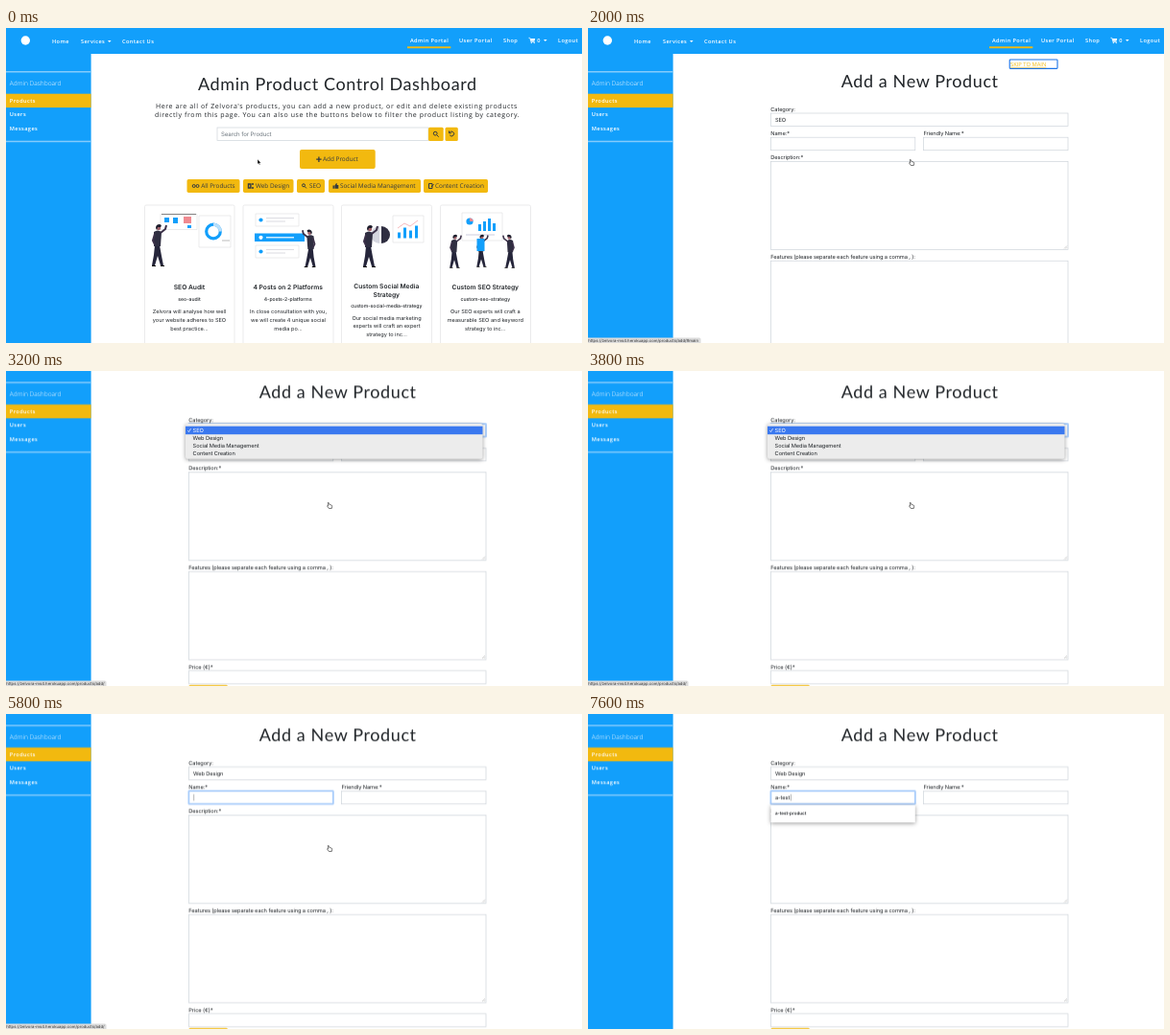
Recreate the animation shown at these times as an HTML page. Size 600 by 329 pixels, loop 8 s.

```html
<!DOCTYPE html>
<html lang="en">
<head>
<meta charset="utf-8">
<title>Admin dashboard</title>
<style>
html, body { margin: 0; width: 100%; height: 100%; overflow: hidden; background: #fff; }
svg { display: block; width: 600px; height: 329px; }
text { font: 5.7px Inter, sans-serif; letter-spacing: -.1px; fill: #212529; text-rendering: geometricPrecision; white-space: pre; }
.h1 { font: 18px Lato, sans-serif; letter-spacing: .6px; }
.lead { font: 7px "Open Sans", sans-serif; letter-spacing: .6px; }
.nav text { font: 600 5.6px "Open Sans", sans-serif; letter-spacing: .4px; fill: #fff; }
.nav .side { font-weight: 300; font-size: 6.6px; letter-spacing: 0; }
.btn text { font: 6.4px "Open Sans", sans-serif; letter-spacing: 0; fill: #343a40; }
.card text { text-anchor: middle; font-size: 5.6px; letter-spacing: 0; }
.card .name { font-size: 6.7px; font-weight: 600; }
.card .slug { font-size: 5.1px; font-weight: 500; }
.skip { font: 5.8px "Open Sans", sans-serif; letter-spacing: 0; fill: #f2b90f; text-decoration: underline; }
.status text { font-size: 4.25px; letter-spacing: 0; fill: #333; }
.hint { font-size: 4.55px; font-weight: 600; letter-spacing: 0; }
.gold { fill: #f2b90f; }
.field { fill: #fff; stroke: #ced4da; stroke-width: .7; }
.ring { fill: #fff; stroke: #a9cdfb; stroke-width: 1.8; }
.box { fill: #fff; stroke: #e2e2e4; stroke-width: .7; }
.line { fill: none; stroke: #343a40; stroke-width: 1; }
.pick { fill: #3a78ef; }
.pick + text { fill: #fff; }
.drop { filter: drop-shadow(0 1.5px 2px #0006); }

.world, .dash, .form, .hover, .press, .wait, .link, .linkmain, .skipbox, .arrow, .hand,
.focus, .menu, .seo, .web, .valseo, .valweb, .name-focus, .popup { animation: 8s step-end infinite; }
.world { animation-name: world; }
.dash { animation-name: dash; }
.form { animation-name: form; }
.hover { animation-name: hover; }
.press, .link0 { animation-name: press; }
.wait { animation-name: wait; }
.link { animation-name: link; }
.linkmain { animation-name: linkmain; }
.skipbox { animation-name: skipbox; }
.arrow { animation-name: arrow; }
.hand { animation-name: hand; }
.focus { animation-name: focus; }
.menu { animation-name: menu; }
.seo { animation-name: seo; }
.web { animation-name: web; }
.valseo { animation-name: valseo; }
.valweb { animation-name: valweb; }
.name-focus { animation-name: name-focus; }
.popup { animation-name: popup; }
@keyframes world { 0% { transform: none } 30%, to { transform: translateY(-33.7px) } }
@keyframes dash { 0% { opacity: 1 } 7.5%, to { opacity: 0 } }
@keyframes form { 0% { opacity: 0 } 7.5%, to { opacity: 1 } }
@keyframes hover { 0% { fill: #f2b90f } 7.5% { fill: #c9a632 } 12.5%, to { fill: #f2b90f } }
@keyframes press { 0% { opacity: 0 } 5% { opacity: 1 } 7.5%, to { opacity: 0 } }
@keyframes wait { 0% { opacity: 0 } 7.5% { opacity: 1 } 15%, to { opacity: 0 } }
@keyframes link { 0% { opacity: 0 } 5% { opacity: 1 } 7.5% { opacity: 0 } 35% { opacity: 1 } 80%, to { opacity: 0 } }
@keyframes linkmain { 0% { opacity: 0 } 22.5% { opacity: 1 } 35%, to { opacity: 0 } }
@keyframes skipbox { 0% { opacity: 0 } 22.5% { opacity: 1 } 30%, to { opacity: 0 } }
@keyframes arrow { 0% { transform: translate(262px, 137px); opacity: 1 } 2.5% { transform: translate(296px, 139px); opacity: 1 } 5%, to { opacity: 0 } }
@keyframes hand { 0% { opacity: 0 } 5% { opacity: 1 } 80%, to { opacity: 0 } }
@keyframes focus { 0% { opacity: 0 } 35% { opacity: 1 } 67.5%, to { opacity: 0 } }
@keyframes menu { 0% { opacity: 0 } 37.5% { opacity: 1 } 62.5%, to { opacity: 0 } }
@keyframes seo { 0% { opacity: 1 } 50%, to { opacity: 0 } }
@keyframes web { 0% { opacity: 0 } 50% { opacity: 1 } 60%, to { opacity: 0 } }
@keyframes valseo { 0% { opacity: 1 } 62.5%, to { opacity: 0 } }
@keyframes valweb { 0% { opacity: 0 } 62.5%, to { opacity: 1 } }
@keyframes name-focus { 0% { opacity: 0 } 67.5%, to { opacity: 1 } }
@keyframes popup { 0% { opacity: 0 } 80%, to { opacity: 1 } }
</style>
</head>
<body>
<svg viewBox="0 0 600 329">
<defs>
  <g id="person">
    <path d="M-3-22 2-22 4-11 6-1 3-1 0-11-3-1-6-1-4-12Z" fill="#25253a"/>
    <path d="M-4-36Q0-39 4-36L3-21H-4Z" fill="#2f2e41"/>
    <path d="M3-35 8-39 9-43M-3-34-5-27-3-23" fill="none" stroke="#3b3048" stroke-width="2"/>
    <circle cx="1" cy="-40" r="2.2" fill="#9f616a"/>
    <path d="M-2-40Q-2-44 2-44 5-43 3-41L0-41-1-38Z" fill="#1d1d2b"/>
    <path d="M-6-1h4v1h-4ZM3-1h4v1H3Z" fill="#111"/>
  </g>
  <path id="grip" d="M-4-1-1-4M-2.2-1-1-2.2" stroke="#888" stroke-width=".4"/>
</defs>
<rect width="600" height="329" fill="#fff"/>

<g class="world">
  <g class="dash">
    <text class="h1" x="200" y="65">Admin Product Control Dashboard</text>
    <text class="lead" x="156" y="84.3">Here are all of Zelvora's products, you can add a new product, or edit and delete existing products</text>
    <text class="lead" x="155" y="93.1">directly from this page. You can also use the buttons below to filter the product listing by category.</text>

    <rect class="field" x="220" y="104" width="220" height="13.5"/>
    <text x="224" y="113" style="font-size:6.1px;fill:#6c757d">Search for Product</text>
    <g class="btn">
      <g class="gold">
        <rect x="440" y="103.7" width="15.7" height="14.2" rx="1.5"/>
        <rect x="457.5" y="103.7" width="13.3" height="14.2" rx="1.5"/>
        <rect x="306" y="127" width="78.7" height="20" rx="2"/>
        <rect x="188.5" y="158" width="55" height="14" rx="1.7"/>
        <rect x="247" y="158" width="52.5" height="14" rx="1.7"/>
        <rect x="303" y="158" width="29" height="14" rx="1.7"/>
        <rect x="336" y="158" width="96" height="14" rx="1.7"/>
        <rect x="435" y="158" width="67" height="14" rx="1.7"/>
      </g>
      <rect class="press" x="306" y="127" width="78.7" height="20" rx="2" fill="#d39e00"/>
      <g class="line">
        <circle cx="447.2" cy="110.2" r="1.9"/><path d="m448.7 111.7 2 2"/>
        <path d="M462 109.5a2.4 2.4 0 1 1 .3 2.5M461.5 107.5v2.3h2.3"/>
        <path d="M323.2 137.2h5.4M325.9 134.5v5.4" stroke-width="1.3"/>
        <circle cx="195.7" cy="165" r="1.5"/><circle cx="199.5" cy="165" r="1.5"/>
        <path d="M252.5 163h2.4v4h-2.4ZM256 163h2M256 167h2" stroke-width="1.4"/>
        <circle cx="310" cy="164.3" r="1.5"/><path d="m311.2 165.5 1.7 1.9"/>
        <path d="M440.5 162.5h3.5v5h-3.5ZM443 166l2.5-3"/>
      </g>
      <path d="M340.5 164.5h1.4v3.3h-1.4ZM342.4 164.5l1.7-2.6q1.2 0 .6 2.2h1.6v3.7h-3.9Z" fill="#343a40"/>
      <text x="330" y="139.4" letter-spacing=".1">Add Product</text>
      <text x="203.3" y="167.3">All Products</text>
      <text x="260" y="167.3">Web Design</text>
      <text x="316" y="167.3">SEO</text>
      <text x="348" y="167.3">Social Media Management</text>
      <text x="447" y="167.3">Content Creation</text>
    </g>

    <g class="box">
      <rect x="144.5" y="185" width="93.5" height="160" rx="1.5"/>
      <rect x="247" y="185" width="94" height="160" rx="1.5"/>
      <rect x="349.5" y="185" width="94" height="160" rx="1.5"/>
      <rect x="452.5" y="185" width="94" height="160" rx="1.5"/>
    </g>
    <g>
      <g class="box">
        <path d="M161 194.5h38v16h-38ZM201 196h33v33h-33Z"/>
        <path d="M260 194h45v13h-45ZM260 227h45v13h-45Z"/>
        <path d="M403 196h32v28h-32Z"/>
        <path d="M475 193h42v29h-42Z"/>
      </g>
      <path d="M165 198h5v5h-5ZM174 198h5v6h-5ZM189 206h4v3h-4Z" fill="#129ffb"/>
      <path d="M185 197h8v7h-8Z" fill="#f08a90"/>
      <path d="M162 194.5h36" stroke="#555" stroke-width=".7"/>
      <circle cx="216" cy="212.5" r="7.3" fill="none" stroke="#129ffb" stroke-width="3.2"/>
      <path d="M216 205.2a7.3 7.3 0 0 1 7.3 7.3" fill="none" stroke="#b9dffb" stroke-width="3.2"/>
      <path d="M225 222h8" stroke="#bbb"/>
      <use href="#person" x="158" y="249"/>

      <rect x="259" y="214.5" width="52" height="8.5" fill="#129ffb"/>
      <path d="M271 198.5h29M271 202h20M271 231.5h29M271 235h20" stroke="#dcdce2" stroke-width="1.2"/>
      <path d="M271 218.8h29" stroke="#fff" stroke-width="1.2"/>
      <g fill="#129ffb"><circle cx="265.5" cy="200.5" r="2.1"/><circle cx="265.5" cy="233.5" r="2.1"/></g>
      <circle cx="265.5" cy="218.8" r="2.1" fill="#fff"/>
      <use href="#person" transform="matrix(-.9 0 0 .9 317 250)"/>

      <path d="M391 207a9 9 0 0 1 0 18Z" fill="#2f2e41"/>
      <path d="M389 207a9 9 0 0 0 0 18Z" fill="#d5d6df"/>
      <path d="M408 219.5v-6h3v6ZM414 219.5v-11h3v11ZM420 219.5v-8h3v8ZM426 219.5v-13h3v13Z" fill="#129ffb"/>
      <path d="m408 209 7-5 6 3 8-6" fill="none" stroke="#f08a90" stroke-width=".6"/>
      <use href="#person" x="378" y="250"/>

      <path d="M492 212v-7h3v7ZM497 212v-10h3v10ZM502 212v-13h3v13ZM507 212v-8h3v8Z" fill="#129ffb"/>
      <circle cx="483" cy="202" r="3.6" fill="#129ffb"/><path d="M483 202v-3.6a3.6 3.6 0 0 1 3.6 3.6Z" fill="#f08a90"/>
      <path d="M479 216h30" stroke="#ccd" stroke-width="1"/>
      <use href="#person" transform="translate(467 251) scale(.8)"/>
      <use href="#person" transform="translate(495 250) scale(.78)"/>
      <use href="#person" transform="matrix(-.8 0 0 .8 525 251)"/>
      <path d="M490.5 220h8v13h-8Z" fill="#129ffb"/>
    </g>
    <g class="card">
      <text class="name" x="191" y="273">SEO Audit</text>
      <text class="slug" x="191" y="285.3">seo-audit</text>
      <text x="191" y="298.4">Zelvora will analyse how well</text>
      <text x="191" y="307">your website adheres to SEO</text>
      <text x="191" y="315.6">best practice...</text>
      <text class="name" x="293.7" y="273">4 Posts on 2 Platforms</text>
      <text class="slug" x="293.7" y="285.3">4-posts-2-platforms</text>
      <text x="294" y="298.4">In close consultation with you,</text>
      <text x="294" y="307">we will create 4 unique social</text>
      <text x="294" y="315.6">media po...</text>
      <text class="name" x="396.3" y="271.7">Custom Social Media</text>
      <text class="name" x="396.3" y="280.7">Strategy</text>
      <text class="slug" x="396.3" y="291.7">custom-social-media-strategy</text>
      <text x="396.5" y="304.5">Our social media marketing</text>
      <text x="396.5" y="313.1">experts will craft an expert</text>
      <text x="396.5" y="321.7">strategy to inc...</text>
      <text class="name" x="499.3" y="273">Custom SEO Strategy</text>
      <text class="slug" x="499.3" y="285.3">custom-seo-strategy</text>
      <text x="499.3" y="298.4">Our SEO experts will craft a</text>
      <text x="499.3" y="307">measurable SEO and keyword</text>
      <text x="499.3" y="315.6">strategy to inc...</text>
    </g>
  </g>

  <g class="form">
    <rect x="89" y="27" width="511" height="345" fill="#fff"/>
    <text class="h1" x="263.7" y="62">Add a New Product</text>
    <text x="190.3" y="86.5">Category:</text>
    <rect class="field" x="190.4" y="89" width="309.6" height="13.4"/>
    <rect class="ring focus" x="190.4" y="89" width="309.6" height="13.4" rx=".5"/>
    <text class="valseo" x="195" y="97.9">SEO</text>
    <text class="valweb" x="195" y="97.9">Web Design</text>
    <text x="190.3" y="112">Name:*</text>
    <text x="349.5" y="112">Friendly Name:*</text>
    <rect class="field" x="190.4" y="114.2" width="150.4" height="13.5"/>
    <rect class="field" x="349.6" y="114.2" width="150.4" height="13.5"/>
    <rect class="ring name-focus" x="190.4" y="114.2" width="150.4" height="13.5" rx=".5"/>
    <text x="195" y="123.2"><tspan id="typed"></tspan><tspan id="caret" font-weight="300">|</tspan></text>
    <text x="190.3" y="137.4">Description:*</text>
    <rect class="field" x="190.4" y="139.6" width="309.6" height="92"/>
    <use href="#grip" x="500" y="231.5"/>
    <text x="190.3" y="241">Features (please separate each feature using a comma , ):</text>
    <rect class="field" x="190.4" y="243.2" width="309.6" height="92"/>
    <use href="#grip" x="500" y="335"/>
    <text x="190.3" y="344.6">Price (€)*</text>
    <rect class="field" x="190.4" y="346.8" width="309.6" height="13.5"/>
    <rect class="gold" x="190.4" y="361.8" width="40.6" height="14" rx="1.5"/>
    <g class="popup">
      <rect class="drop" x="190.4" y="129" width="150.4" height="18" fill="#fff"/>
      <text class="hint" x="195" y="139.4">a-test-product</text>
    </g>
    <g class="skipbox">
      <rect x="439.2" y="33" width="49.8" height="9.4" rx=".8" fill="#fff" stroke="#1a73e8" stroke-width="1.1"/>
      <text class="skip" x="440" y="39.9">SKIP TO MAIN</text>
    </g>
  </g>

  <g class="nav">
    <path d="M0 0H600V27H88.6V380H0Z" fill="#129ffb"/>
    <circle cx="20.3" cy="13" r="4.7" fill="#fff"/>
    <text x="48" y="16.1">Home</text>
    <text x="78" y="16.1">Services</text>
    <text x="121" y="16.1">Contact Us</text>
    <text x="421" y="15.2">Admin Portal</text>
    <text x="472" y="15.2">User Portal</text>
    <text x="518" y="15.2">Shop</text>
    <text x="553.2" y="15.2">0</text>
    <text x="575" y="15.2">Logout</text>
    <path d="M106 13h3.6l-1.8 1.9ZM560 12h3.6l-1.8 1.9ZM546 11h5.2l-.7 2.8h-3.8Z" fill="#fff"/>
    <path d="M544.4 10.3h1.4l1 4.2h4" fill="none" stroke="#fff" stroke-width=".7"/>
    <g fill="#fff"><circle cx="547.3" cy="15.6" r=".7"/><circle cx="550.2" cy="15.6" r=".7"/></g>
    <rect class="gold" x="418" y="19.3" width="45.3" height="1.9"/>
    <path d="M0 45.8H88.6M0 118.6H88.6" stroke="#84cbfb" stroke-width="1.5"/>
    <text class="side" x="3.8" y="60.4">Admin Dashboard</text>
    <rect class="gold hover" y="68.7" width="88.6" height="14.4"/>
    <text x="3.8" y="77.8">Products</text>
    <text x="3.8" y="92.3">Users</text>
    <text x="3.8" y="106.8">Messages</text>
  </g>
</g>

<g class="menu">
  <rect class="drop" x="187" y="55" width="309.5" height="36.8" rx="2" fill="#ececec"/>
  <text x="194.6" y="64">SEO</text>
  <text x="194.6" y="72">Web Design</text>
  <text x="194.6" y="80">Social Media Management</text>
  <text x="194.6" y="88">Content Creation</text>
  <path d="m189.3 62.2 1.2 1.4 2-3.4" fill="none" stroke="#222" stroke-width=".7"/>
  <g class="seo">
    <rect class="pick" x="187" y="57.7" width="309.5" height="8.5"/>
    <text x="194.6" y="64">SEO</text>
    <path d="m189.3 62.2 1.2 1.4 2-3.4" fill="none" stroke="#fff" stroke-width=".7"/>
  </g>
  <g class="web">
    <rect class="pick" x="187" y="65.7" width="309.5" height="8.3"/>
    <text x="194.6" y="72">Web Design</text>
  </g>
</g>

<g class="status">
  <g class="wait">
    <path d="M0 323.6H198q1.5 0 1.5 1.5V329H0Z" fill="#dcdcdc"/>
    <text x=".3" y="328.3">Waiting for m.stripe.com...</text>
  </g>
  <g class="link">
    <path d="M0 323.6H103q1.5 0 1.5 1.5V329H0Z" fill="#dcdcdc"/>
    <text x=".3" y="328.3">https://zelvora-ms4.herokuapp.com/products/add/</text>
  </g>
  <g class="linkmain">
    <path d="M0 323.6H116q1.5 0 1.5 1.5V329H0Z" fill="#dcdcdc"/>
    <text x=".3" y="328.3">https://zelvora-ms4.herokuapp.com/products/add/#main</text>
  </g>
</g>

<path class="arrow" d="M0 0V5.2L1.2 4.2 2 6 2.9 5.6 2.1 3.9H3.6Z" fill="#000" stroke="#fff" stroke-width=".4"/>
<path class="hand" d="M335.3 137.6q.9-.6 1.2.3l.4 1.6 2 .5q.9.3.8 1.2l-.4 2.3h-3l-1.8-2.5q0-.8 1.2-.2Z" fill="#fff" stroke="#333" stroke-width=".65"/>
</svg>

<script>
const typed = document.getElementById('typed');
const caret = document.getElementById('caret');
const word = 'a-test', focusAt = 5400, typeAt = 6400, step = 200;
let start;

function tick(now) {
  start ??= now;
  const t = (now - start) % 8000;
  const count = Math.max(0, Math.floor((t - typeAt) / step) + 1);
  const lit = t >= typeAt || (t >= focusAt && (t - focusAt) % 1000 < 500);
  typed.textContent = word.slice(0, count);
  caret.setAttribute('fill-opacity', lit ? 1 : 0);
  requestAnimationFrame(tick);
}
requestAnimationFrame(tick);
</script>
</body>
</html>
```
